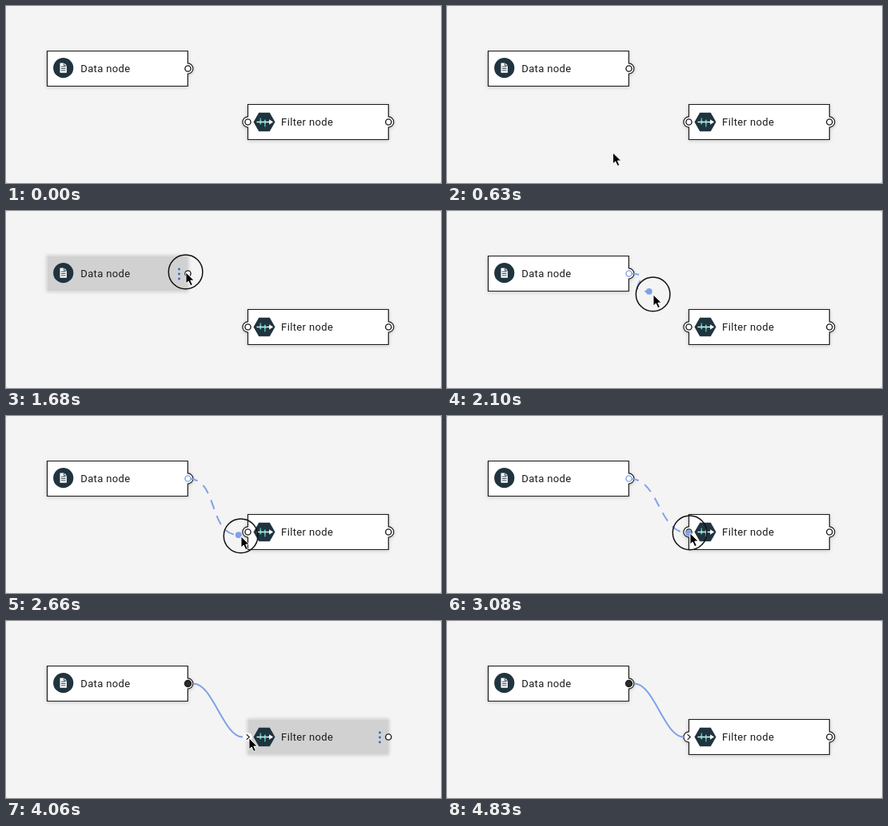
Recreate the animation shown at these times as an HTML page. Size 544 by 222 pixels, loop 5.32 s.

```html
<!DOCTYPE html>
<html lang="en">
<head>
<meta charset="utf-8">
<title>Connecting nodes</title>
<style>
  html, body { margin: 0; width: 100%; height: 100%; overflow: hidden; background: #d4d4d4; }
  svg { display: block; width: 100vw; height: 100vh; }
  text { font: 13px Roboto, "Open Sans", sans-serif; letter-spacing: .36px; fill: #1c1c1c; }
  .box { fill: #fff; stroke: #1b1b1b; stroke-width: 1.2; filter: drop-shadow(0 1px 2px rgba(0, 0, 0, .2)); }
  .hover .box { fill: #d1d1d1; stroke: #dedede; stroke-width: 1; filter: drop-shadow(0 0 2px rgba(0, 0, 0, .2)); }
  .menu { fill: #2f62dc; visibility: hidden; }
  .hover .menu { visibility: visible; }
  .port { fill: #fff; stroke: #1b1b1b; stroke-width: 1.4; }
  .link { fill: none; stroke: #7fa2e8; stroke-width: 2; }
</style>
</head>
<body>
<svg viewBox="0 0 544 222" preserveAspectRatio="none">
  <rect width="544" height="222" rx="3" fill="#f4f4f4"/>

  <g id="data" transform="translate(51.5 56.5)">
    <path class="box"/>
    <circle cx="20.2" cy="21.2" r="12.6" fill="#20343f"/>
    <path d="M16 14.9h5.2l3.2 3.2v9.2H16z" fill="#fff"/>
    <path d="M21 14.9v3.4h3.4M17.4 19.6h5.6M17.4 22h5.6M17.4 24.4h5.6" fill="none" stroke="#20343f" stroke-width=".9"/>
    <text x="41.8" y="26.4">Data node</text>
    <g class="menu"></g>
  </g>

  <g id="filter" transform="translate(302.5 123.5)">
    <path class="box"/>
    <path d="M7 22l6.7-11.8h13.6L34 22l-6.7 11.8H13.7z" fill="#20343f"/>
    <path d="M11 22h17" stroke="#fff" stroke-width="1.4"/>
    <path d="M26.6 18.8l5 3.2-5 3.2z" fill="#fff"/>
    <path d="M15.8 17v8M21.4 19v9" stroke="#45b5aa" stroke-width="1.6"/>
    <path d="M15.8 19.8l2.2 2.2-2.2 2.2-2.2-2.2zM21.4 19.8l2.2 2.2-2.2 2.2-2.2-2.2z" fill="#8edbd2"/>
    <text x="41.6" y="26.4">Filter node</text>
    <g class="menu"></g>
    <circle id="inPort" class="port" cy="22" r="3.6"/>
    <g id="joined">
      <circle cy="22" r="5.4" fill="#fff"/>
      <path d="M-1.8 18.6L1.8 22l-3.6 3.4" fill="none" stroke="#1b1b1b" stroke-width="1.2"/>
    </g>
    <circle class="port" cx="175.8" cy="22" r="3.6"/>
  </g>

  <path id="link" class="link"/>
  <circle id="dot" r="3.9" fill="#7fa2e8"/>
  <circle id="outPort" class="port" cx="227.5" cy="78.5"/>

  <g id="pointer">
    <circle id="ring" cx="-.4" cy="-.6" r="21.3" fill="none" stroke="#111" stroke-width="1.5"/>
    <path d="M0 0V14L3.2 11 5.8 16.6 8.3 15.5 5.8 10.1H10.2Z" fill="#000" stroke="#fff" stroke-width=".9"/>
  </g>
</svg>
<script>
const LOOP = 5320, STEP = 70, WIDTH = 175.8, HEIGHT = 44;
const DRAG = 1820, JOIN = 3990, EXIT = 4830;
const $ = id => document.getElementById(id);
const show = (id, on) => $(id).setAttribute('visibility', on ? 'visible' : 'hidden');
const setAll = (id, attrs) => {
  for (const k in attrs) $(id).setAttribute(k, attrs[k]);
};

// Pointer moves; it rests in between
const moves = [
  { from: 70, to: 210, x: 204, y: 200 },
  { from: 560, to: 1050, x: 228, y: 88 },
  { from: 1050, to: 1540, x: 225, y: 77 },
  { from: 1750, to: 2100, x: 258, y: 105 },
  { from: 2100, to: 2310, x: 276, y: 141 },
  { from: 2310, to: 2660, x: 294, y: 151 },
  { from: 2660, to: 3080, x: 304, y: 147 },
  { from: 4340, to: EXIT, x: 276, y: 226 }
];

function pointerAt(t) {
  let x = 213, y = 226;
  for (const m of moves) {
    const k = Math.min(1, Math.max(0, (t - m.from) / (m.to - m.from)));
    x += (m.x - x) * k;
    y += (m.y - y) * k;
  }
  return [x, y];
}

const over = (x, y, left, top) =>
  x > left - 3 && x < left + WIDTH + 3 && y > top && y < top + HEIGHT;

const curve = (x1, y1, x2, y2, d) =>
  `M${x1} ${y1}C${x1 + d} ${y1} ${x2 - d} ${y2} ${x2} ${y2}`;

// Node outline, with a bump around each port unless hovered
function outline(hasInput, hover) {
  const bump = 'a6.6 6.6 0 0 1 0 ';
  const right = hover ? '' : `V15.4${bump}13.2`;
  const left = hover || !hasInput ? '' : `V28.6${bump}-13.2`;
  return `M0 0H${WIDTH}${right}V${HEIGHT}H0${left}Z`;
}

function setNode(id, hasInput, hover) {
  $(id).classList.toggle('hover', hover);
  $(id).querySelector('.box').setAttribute('d', outline(hasInput, hover));
}

document.querySelectorAll('.menu').forEach(menu => {
  menu.innerHTML = [-1, 0, 1].map(i => `<circle cx="165" cy="${22.5 + i * 6}" r="1.4"/>`).join('');
});

function draw(time) {
  const t = Math.floor((time % LOOP) / STEP) * STEP;
  const [x, y] = pointerAt(t);
  const linked = t >= JOIN;
  const dragging = t >= DRAG && !linked;

  setNode('data', false, t < DRAG && over(x, y, 51.5, 56.5));
  setNode('filter', true, linked && over(x, y, 302.5, 123.5));
  show('inPort', !linked);
  show('joined', linked);

  show('link', dragging || linked);
  show('dot', dragging);
  if (dragging) {
    // The loose end trails the pointer slightly
    const [px, py] = pointerAt(t - 45);
    const ex = px - 1, ey = py - .5;
    setAll('link', { d: curve(228, 78.5, ex, ey, 38), 'stroke-dasharray': '12 9' });
    setAll('dot', { cx: ex, cy: ey });
  } else if (linked) {
    setAll('link', { d: curve(234.5, 78.5, 296, 145.5, 24), 'stroke-dasharray': 'none' });
  }
  setAll('outPort', {
    r: linked ? 4 : 3.6,
    style: dragging ? 'stroke:#7fa2e8' : linked ? 'fill:#2b2b2b' : ''
  });

  const visible = t >= STEP && t < EXIT;
  const pressed = (t >= 350 && t < 490) || (t >= 1680 && t < 3850);
  show('pointer', visible);
  show('ring', visible && pressed);
  setAll('pointer', { transform: `translate(${x} ${y})` });
}

const start = performance.now();
function tick() {
  draw(performance.now() - start);
  requestAnimationFrame(tick);
}
tick();
</script>
</body>
</html>
```
